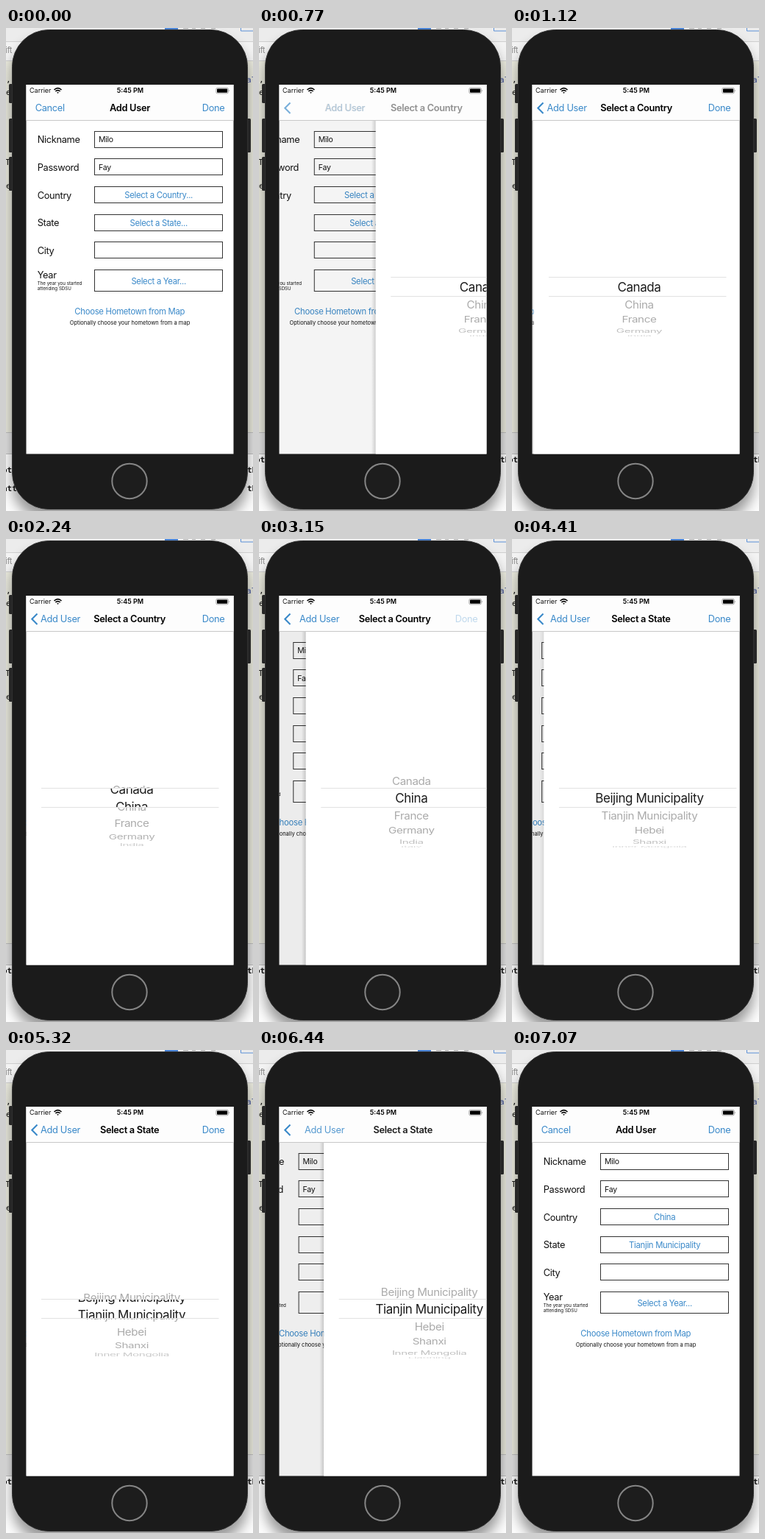
Write an HTML page that moves like this. It is 336 px wide and 656 px high and loops after 7280 ms.

```html
<!DOCTYPE html>
<html lang="en">
<head>
<meta charset="utf-8">
<title>Add User</title>
<style>
html, body { margin: 0; width: 100%; height: 100%; overflow: hidden; background: #e6e6de; }
svg { display: block; width: 336px; height: 656px; }
text { font-family: Inter, "Open Sans", sans-serif; letter-spacing: -.025em; white-space: pre; }
.mono { font-family: "DejaVu Sans Mono", "Noto Sans Mono", monospace; letter-spacing: 0; }
.loose { letter-spacing: 0; }
</style>
</head>
<body>
<svg id="stage" viewBox="0 0 336 656" xmlns="http://www.w3.org/2000/svg">
  <defs>
    <clipPath id="screen"><rect x="27.5" y="77" width="282" height="501.5"/></clipPath>
    <clipPath id="band"><rect x="28" y="338.5" width="282" height="26"/></clipPath>
    <clipPath id="offBand"><path d="M28 270h282v68.5H28zM28 364.5h282v70H28z"/></clipPath>
    <linearGradient id="edge"><stop offset="0" stop-opacity="0"/><stop offset="1" stop-opacity=".16"/></linearGradient>
    <filter id="blur" x="-20%" y="-20%" width="140%" height="140%"><feGaussianBlur stdDeviation="9"/></filter>
  </defs>

  <g id="desk">
    <rect width="336" height="656" fill="#e9e9dd"/>
    <rect width="336" height="18" fill="#ececec"/>
    <rect y="18" width="336" height="27" fill="#f3f3f3"/>
    <path d="M0 18.500h336M0 44.500h336" stroke="#cecece"/>
    <rect y="549" width="336" height="30" fill="#e2e2e2"/>
    <path d="M0 549.500h336M0 578.500h336" stroke="#c0c0c0"/>
    <rect y="579" width="336" height="77" fill="#fdfdfd"/>
    <rect x="216" width="18" height="2" fill="#4c86d8"/>
    <path d="M241 .5h7m5 0h5m7 0h6m8 0h6" stroke="#aaa"/>
    <path d="M319.500 0v4h17" fill="none" stroke="#5b90d6"/>
  </g>
  <rect x="8" y="16" width="321" height="652" rx="50" opacity=".4" filter="url(#blur)"/>
  <g id="log"></g>

  <g fill="#262626">
    <rect x="4" y="76" width="6" height="26" rx="1.500"/>
    <rect x="4" y="123" width="6" height="46" rx="1.500"/>
    <rect x="4" y="175" width="6" height="46" rx="1.500"/>
    <rect x="327" y="123" width="6" height="46" rx="1.500"/>
  </g>
  <rect x="8.500" y="2.500" width="320" height="651" rx="50" fill="#1b1b1b" stroke="#303030"/>
  <circle cx="168" cy="615.500" r="23.700" fill="#1d1d1d" stroke="#858585" stroke-width="2"/>

  <g clip-path="url(#screen)">
    <rect x="27" y="77" width="283" height="502" fill="#fff"/>
    <g id="form"></g>
    <rect id="dim" x="27" y="77" width="283" height="502"/>
    <g id="sub">
      <rect id="shade" x="21.500" y="77" width="6" height="502" fill="url(#edge)"/>
      <rect x="27.500" y="77" width="283" height="502" fill="#fff"/>
      <g id="far" clip-path="url(#offBand)"></g>
      <g id="near" clip-path="url(#band)"></g>
      <path d="M48 338.500h241.500M48 364.500h241.500" stroke="#e2e2e2"/>
    </g>
    <rect x="27" y="77" width="283" height="48" fill="#fdfdfd"/>
    <path d="M27 125.500h283" stroke="#c8c8c8"/>
    <g id="bar"></g>
    <g fill="none" stroke="#000" stroke-width="1.600">
      <path d="M65.500 84q5-4.600 10 0M67.300 86q3.200-2.900 6.400 0"/>
      <path d="M69 87.300h3l-1.500 1.800z" fill="#000" stroke="none"/>
    </g>
    <rect x="285.800" y="81.300" width="16.600" height="7.600" rx="1.800" fill="none" stroke="#8a8a8a" stroke-width=".7"/>
    <rect x="287" y="82.500" width="14.200" height="5.200" rx=".8"/>
    <path d="M303.500 83.800q1.600 1.300 0 2.600z" fill="#8a8a8a"/>
  </g>
</svg>

<script>
const LOOP = 7280, STEP = 70, WIDTH = 282, BLUE = "#3a89c9";
const $ = id => document.getElementById(id);

function add(parent, tag, attrs, content = "") {
  const el = document.createElementNS("http://www.w3.org/2000/svg", tag);
  for (const k in attrs) el.setAttribute(k, attrs[k]);
  el.textContent = content;
  return parent.appendChild(el);
}

// y is the middle of the capitals
function label(parent, str, x, y, size, attrs = {}) {
  return add(parent, "text", { x, y: y + size * .363, "font-size": size, fill: "#111", ...attrs }, str);
}
const MID = { "text-anchor": "middle" };
const LINK = { ...MID, fill: BLUE };
const LOOSE = { class: "loose" };

// Code behind the phone
const mono = { class: "mono" };
[[",", 0, 70], ["e", 0, 87], ["T", -1, 182], ["e", 0, 214]].forEach(([s, x, y]) => label($("desk"), s, x, y, 11, mono));
label($("desk"), "ift", -1, 30, 11, { fill: "#888" });
label($("desk"), "al", 327, 70, 11, { ...mono, fill: "#34489a" });
function logLine(left, right, y) {
  const g = add($("log"), "g", { "font-weight": 700 });
  label(g, left, -5, y, 11, mono);
  label(g, right, 328, y, 11, mono);
  return g;
}
const early = [logLine("ott", "th", 600), logLine("att", "th", 625)];
const late = logLine("ott", "th", 586.5);

// Form
const form = $("form");
const rows = [["Nickname", 151.5, "Milo"], ["Password", 189, "Fay"], ["Country", 227], ["State", 264.5], ["City", 302], ["Year", 343]];
for (const [name, y, value] of rows) {
  const h = name === "Year" ? 29 : 22;
  label(form, name, 42.7, name === "Year" ? 335.5 : y, 12.8);
  add(form, "rect", { x: 120.5, y: Math.round(y - h / 2) - .5, width: 174, height: h, fill: "#fff", stroke: "#333" });
  if (value) label(form, value, 126, y, 10.5);
}
const country = label(form, "", 207.7, 227, 11.3, LINK);
const state = label(form, "", 207.7, 264.5, 11.3, LINK);
label(form, "Select a Year...", 207.7, 343.5, 11.3, LINK);
label(form, "The year you started", 42.7, 347.2, 6.2, LOOSE);
label(form, "attending SDSU", 42.7, 354, 6.2, LOOSE);
label(form, "Choose Hometown from Map", 168.3, 384.7, 11.3, LINK);
label(form, "Optionally choose your hometown from a map", 168.5, 400.3, 7.5, { ...MID, ...LOOSE });

// Bars
const bar = $("bar");
const bold = { ...MID, "font-weight": 600, fill: "#000" };
label(bar, "Carrier", 32, 85, 9, LOOSE);
label(bar, "5:45 PM", 169, 85, 9, { ...bold, ...LOOSE });
const cancel = label(bar, "Cancel", 39.7, 108.7, 12.8, { fill: BLUE });
const done = label(bar, "Done", 297.5, 108.7, 12.8, { fill: BLUE, "text-anchor": "end" });
const chevron = add(bar, "path", { d: "M42.500 101.500l-7.200 7.300 7.200 7.300", fill: "none", stroke: BLUE, "stroke-width": 2.1 });
const rootTitle = label(bar, "Add User", 168.5, 108.7, 12.8, bold);
const back = label(bar, "Add User", 47, 108.7, 12.8, { fill: BLUE });
const subTitle = label(bar, "", 168.2, 108.7, 12.8, bold);

// Picker
const lists = {
  Country: ["Canada", "China", "France", "Germany", "India", "Italy"],
  State: ["Beijing Municipality", "Tianjin Municipality", "Hebei", "Shanxi", "Inner Mongolia", "Liaoning"]
};
const wheel = lists.Country.map(() => [
  label($("far"), "", 0, 0, 15.2, { ...MID, fill: "#aaa" }),
  label($("near"), "", 0, 0, 17, { ...MID, fill: "#1c1c1c" })
]);

const ramp = (v, a, b) => Math.min(1, Math.max(0, (v - a) / (b - a)));
const smooth = u => u * u * (3 - 2 * u);
const easeOut = u => 1 - (1 - u) ** 3;
const within = (t, a, b) => t >= a && t < b;
const fade = (el, v) => el.setAttribute("opacity", v.toFixed(3));
const shift = (el, x) => el.setAttribute("transform", `translate(${x.toFixed(2)} 0)`);

function drawWheel(names, pos) {
  wheel.forEach((pair, i) => {
    const angle = (i - pos) * 20.5 * Math.PI / 180;
    const y = 352 + 67 * Math.sin(angle);
    const squash = Math.max(0, Math.cos(angle));
    const seen = Math.abs(angle) < 1.5;
    pair.forEach(el => {
      el.textContent = names[i];
      el.setAttribute("transform", `translate(171 ${y.toFixed(2)}) scale(1 ${squash.toFixed(3)})`);
      fade(el, seen ? 1 - .6 * ramp(Math.abs(angle), .8, 1.45) : 0);
    });
  });
}

// One visit to a picker page: push, turn the wheel, pop
const visits = [
  { name: "Country", tap: 560, push: 635, spin: [2050, 2430], press: 3010, pop: 3124, end: 3780 },
  { name: "State", tap: 3850, push: 4040, spin: [5125, 5445], press: 6300, pop: 6395, end: LOOP }
];

function draw(t) {
  const v = visits.find(s => t < s.end);
  const popping = t >= v.pop;
  const q = popping ? 1 - easeOut(ramp(t, v.pop, v.pop + 580)) : easeOut(ramp(t, v.push, v.push + 600));

  early.forEach(g => fade(g, t < STEP ? 1 : 0));
  fade(late, t < STEP ? 0 : 1);

  const [first, second] = visits;
  country.textContent = t < first.pop ? "Select a Country..." : "China";
  state.textContent = t < second.pop ? "Select a State..." : "Tianjin Municipality";
  fade(country, within(t, first.tap, first.push) ? .3 : 1);
  fade(state, within(t, second.tap, second.push) ? .3 : 1);

  shift(form, -.3 * WIDTH * q);
  fade($("dim"), .085 * q);
  shift($("sub"), q > 0 ? WIDTH * (1 - q) : WIDTH + 10);
  fade($("shade"), ramp(1 - q, 0, .12));
  drawWheel(lists[v.name], smooth(ramp(t, ...v.spin)));

  const slide = 95 * (1 - q) ** (popping ? 1.2 : 1.03);
  shift(back, slide);
  shift(rootTitle, slide - 95);
  shift(subTitle, 128 * (1 - q));
  subTitle.textContent = "Select a " + v.name;
  fade(back, ramp(q, .4, .85));
  fade(rootTitle, 1 - ramp(q, .1, .6));
  fade(subTitle, ramp(q, .3, .85));
  fade(cancel, 1 - ramp(q, .05, .4));
  fade(chevron, ramp(q, .2, .7));
  const pressed = within(t, v.press, v.pop) ? .3 : 1;
  fade(done, pressed * (q > .5 ? ramp(q, .84, .94) : 1 - ramp(q, .1, .4)));
}

const start = performance.now();
function tick() {
  const t = (performance.now() - start) % LOOP;
  draw(Math.floor(t / STEP) * STEP);
  requestAnimationFrame(tick);
}
tick();
</script>
</body>
</html>
```
